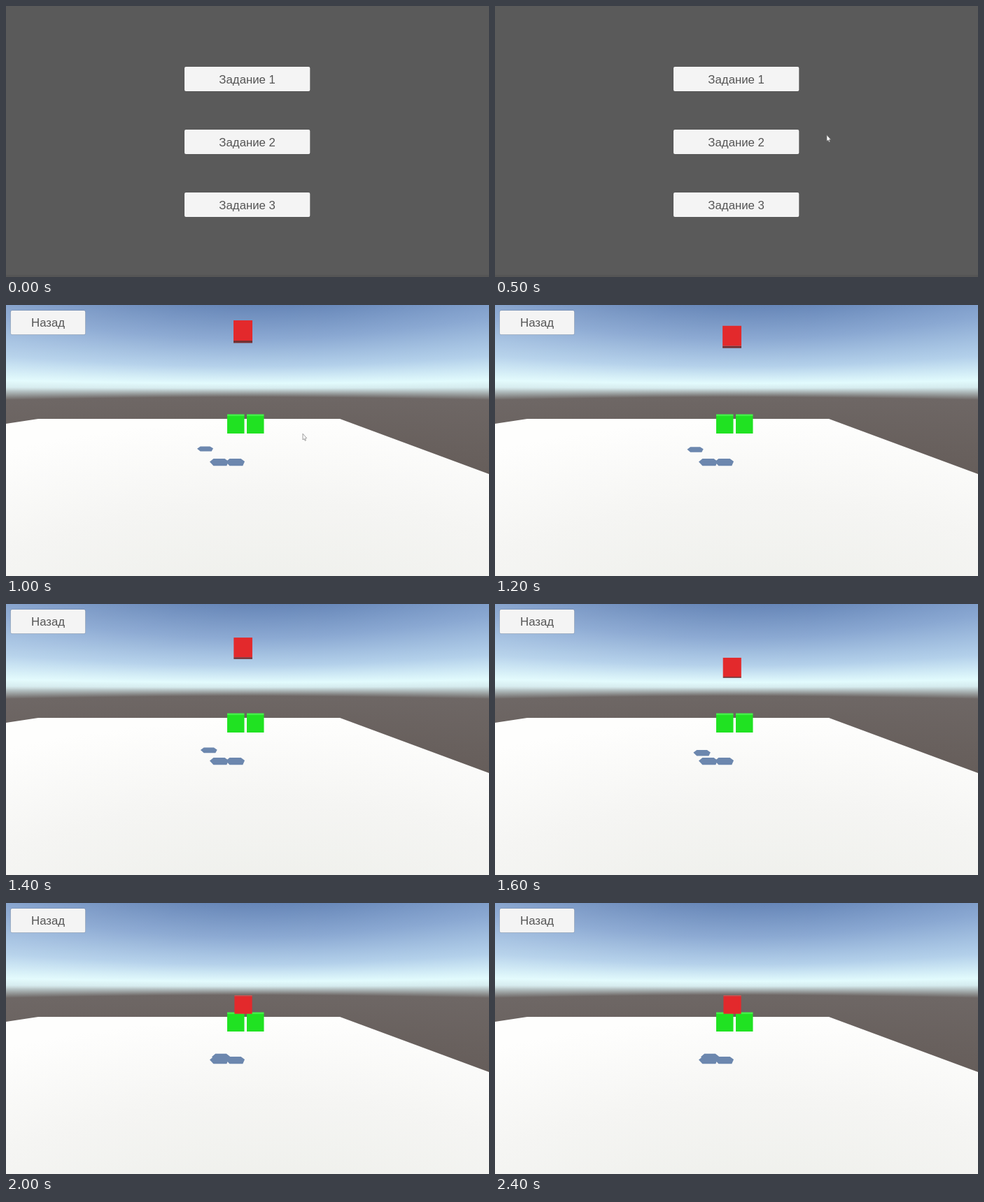
An HTML page with a canvas that plays this animation: 690 px wide and 388 px high, repeating every 3.9 s.

```html
<!DOCTYPE html>
<html lang="ru">
<head>
<meta charset="utf-8">
<style>
  html, body { margin: 0; width: 100%; height: 100%; overflow: hidden; background: #5a5a5a; }
  canvas { display: block; }
</style>
</head>
<body>
<canvas id="stage" width="690" height="388"></canvas>
<script>
const W = 690, H = 388, LOOP = 3900, STEP = 100;
const CURSOR_IN = 300, SCENE_START = 1000, CURSOR_OUT = 1200;
const GREEN = { front: '#20e222', top: '#42f046', under: '#1bbd22' };
const RED = { front: '#e3292c', top: '#f0504c', under: '#743032' };
const ctx = document.getElementById('stage').getContext('2d');

const mix = (from, to, k) => from + (to - from) * k;

function layer(paint) {
  const canvas = document.createElement('canvas');
  canvas.width = W;
  canvas.height = H;
  paint(canvas.getContext('2d'));
  return canvas;
}

function trace(c, points) {
  c.beginPath();
  points.forEach(([x, y]) => c.lineTo(x, y));
  c.closePath();
}

function addStops(gradient, stops) {
  stops.forEach(([at, color]) => gradient.addColorStop(at, color));
  return gradient;
}

function button(c, label, x, y, w, h) {
  c.beginPath();
  c.roundRect(x, y, w, h, 2);
  c.strokeStyle = '#4e4e4e55';
  c.stroke();
  c.fillStyle = '#f4f4f4';
  c.fill();
  c.fillStyle = '#555';
  c.font = '16.8px "Liberation Sans", Arial, sans-serif';
  c.textAlign = 'center';
  c.fillText(label, x + w / 2, y + h / 2 + 6);
}

// Lines of equal elevation bend away from the horizon towards the sides.
function paintSky(c) {
  const horizon = 122, focal = 336;
  const stops = [
    [0, '#6484b6'], [0.2, '#8aa8d2'], [0.36, '#b3d0ea'], [0.46, '#e2fbfd'],
    [0.488, '#d5ebee'], [0.54, '#6e6765'], [1, '#625955']
  ];
  for (let x = 0; x < W; x++) {
    const reach = horizon * Math.hypot(1, (x - W / 2) / focal);
    c.fillStyle = addStops(c.createLinearGradient(0, horizon - reach, 0, horizon + reach), stops);
    c.fillRect(x, 0, 1, H);
  }
  c.fillStyle = addStops(c.createLinearGradient(0, 0, 480, 0), [[0, '#ffffff10'], [1, '#ffffff00']]);
  c.fillRect(0, 0, W, horizon);
}

function paintGround(c) {
  c.save();
  trace(c, [[0, 170], [46, 163], [477, 163], [W, 242], [W, H], [0, H]]);
  c.clip();
  c.translate(380, 480);
  c.scale(2.45, 1);
  c.fillStyle = addStops(c.createRadialGradient(0, 0, 80, 0, 0, 315),
    [[0, '#eff0ec'], [0.5, '#f5f5f3'], [1, '#fefefd']]);
  c.fillRect(-W, -H, 2 * W, H);
  c.restore();
}

function shadow(c, x, y, w, h) {
  const outline = [[0, 0.45], [0.2, 0], [0.8, 0], [1, 0.4], [0.9, 1], [0.2, 1]];
  trace(c, outline.map(([u, v]) => [x + u * w, y + v * h]));
  c.fillStyle = '#6c87ae';
  c.fill();
}

function cube(c, x, y, w, h, topEdge, underEdge, colors) {
  const strip = (color, top, height) => {
    c.fillStyle = color;
    c.fillRect(x, top, w, height);
  };
  strip(colors.top, y - topEdge, topEdge);
  strip(colors.under, y + h, underEdge);
  strip(colors.front, y, h);
}

const menu = layer(c => {
  c.fillStyle = '#5a5a5a';
  c.fillRect(0, 0, W, H);
  c.fillStyle = '#555';
  c.fillRect(0, 385, W, 3);
  for (let n = 1; n <= 3; n++) button(c, 'Задание ' + n, 255, 90 * n - 3, 179.3, 35);
});

const scenery = layer(c => {
  paintSky(c);
  paintGround(c);
  button(c, 'Назад', 6.8, 8, 106.5, 34.3);
  for (let n = 0; n < 2; n++) {
    shadow(c, 291 + 23 * n, 220, 27, 10.2);
    cube(c, 316 + 28 * n, 159, 24.5, 25, 2.6, 0, GREEN);
  }
});

function fallingCube(seconds) {
  const fall = Math.min(1, 0.113 * seconds + 1.18 * seconds ** 2);
  shadow(ctx, mix(273, 294, fall), mix(202.4, 215.8, fall), mix(23, 26, fall), mix(7.2, 9.8, fall));
  cube(ctx, mix(325, 326.4, fall), mix(22, 133.5, fall), mix(27, 25.2, fall), mix(29, 25.2, fall),
    fall === 1 ? 1.2 : 0, mix(3.4, 0, fall), RED);
}

function cursor(t) {
  const progress = Math.min(1, (t - CURSOR_IN) / 400);
  const remaining = (1 - progress) ** 2.15;
  const x = 423.7 + 222 * remaining, y = 184 + 9 * remaining ** 2;
  const arrow = [[0, 0], [0, 8.6], [2, 7.2], [3.2, 10], [4.4, 9.5], [3.3, 6.8], [5.6, 6.4]];
  trace(ctx, arrow.map(([dx, dy]) => [x + dx + 0.3, y + dy + 0.3]));
  ctx.fillStyle = '#fff';
  ctx.fill();
  ctx.strokeStyle = '#777';
  ctx.lineWidth = 0.7;
  ctx.stroke();
}

function draw() {
  const t = Math.floor(performance.now() % LOOP / STEP) * STEP;
  const inScene = t >= SCENE_START;
  ctx.drawImage(inScene ? scenery : menu, 0, 0);
  if (inScene) fallingCube((t - SCENE_START) / 1000);
  if (t >= CURSOR_IN && t < CURSOR_OUT) cursor(t);
  requestAnimationFrame(draw);
}
draw();
</script>
</body>
</html>
```
